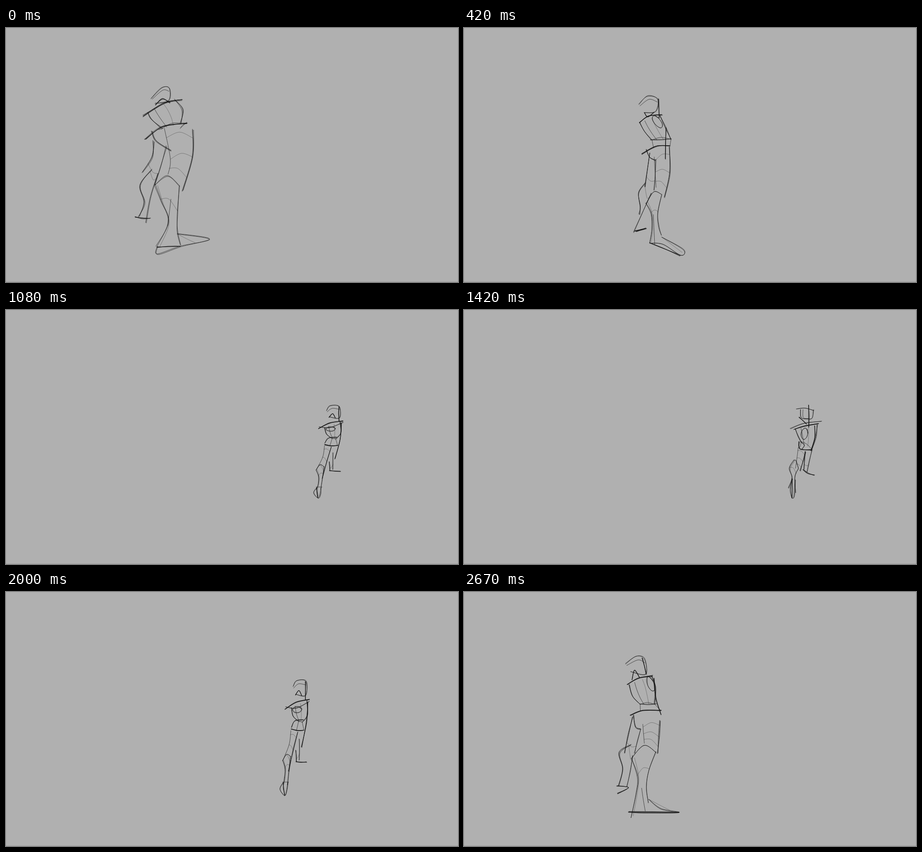
Write an HTML page that moves like this. It is 998x561 px and loops after 2830 ms.

```html
<!DOCTYPE html>
<html lang="en">
<head>
<meta charset="utf-8">
<title>Walking figure sketch</title>
<style>
html, body { margin: 0; width: 100%; height: 100%; overflow: hidden; background: #b0b0b0; }
svg { display: block; width: 998px; height: 561px; }
path { fill: none; stroke: #101010; stroke-linecap: round; stroke-linejoin: round; }
.n { stroke-width: .9; stroke-opacity: .74; }
.b { stroke-width: 1.2; stroke-opacity: .85; }
.f { stroke-width: .75; stroke-opacity: .45; }
</style>
</head>
<body>
<svg id="stage" viewBox="0 0 998 561"><rect y="560" width="998" height="1" fill="#a2a2a2"/></svg>
<script>
// Weight and number of passes for each part of the body
const style = {
  head: 'n2', strap: 'b2', neck: 'b2', shoulder: 'b3', chestL: 'n3', chestR: 'n3', hem: 'n2', side: 'b2',
  belt: 'b3', hip: 'n3', farL: 'n3', farR: 'n2', nearL: 'n1', nearR: 'n3', farA: 'n3', farB: 'n2',
  farFoot: 'b2', nearA: 'n2', nearB: 'n2', foot: 'n2', mid: 'n1'
};

// Each part is a line through a few points
const near = {
  head: '321 155 343 132 360 133 359 160 330 166', neck: '330 170 345 156 362 166',
  shoulder: '303 194 350 165 389 158', chestL: '313 186 322 203 345 222', chestR: '372 157 390 180 386 210',
  belt: '307 246 345 219 400 210', hem: '384 222 399 208', hip: '322 228 330 250 364 272',
  farL: '326 250 322 285 300 320', farR: '355 262 328 347', nearL: '350 222 363 290 358 323',
  nearR: '412 225 412 285 390 360', farA: '322 312 297 347 305 385 293 417', farB: '335 322 318 375 308 430',
  farFoot: '285 418 317 421', nearA: '328 348 342 382 358 428 333 484', nearB: '383 348 378 410 379 448 386 480',
  foot: '333 484 334 499 385 482 450 467 378 455', mid: '364 378 357 437'
};
const step = {
  head: '357 159 380 142 398 148 402 182 368 176', strap: '394 146 403 182', neck: '371 194 376 173 387 188',
  shoulder: '361 204 385 190 416 185', chestL: '364 204 372 230 389 248', chestR: '414 186 423 210 421 248',
  hem: '388 248 425 247', side: '420 190 424 235 435 270', belt: '367 272 395 261 435 262',
  hip: '375 272 378 298 391 303', farL: '372 276 354 356', farR: '390 304 376 356', nearL: '395 292 398 334',
  nearR: '433 284 428 356', farA: '368 338 343 355 350 390 341 428', farB: '373 362 360 430',
  farFoot: '338 428 363 432 339 446', nearA: '370 368 383 410 380 445 369 498',
  nearB: '424 354 408 395 403 430 407 466', foot: '363 486 400 488 475 487 435 478 408 458', mid: '392 433 400 484',
  arm: '412 203 7 17 -22'
};
const stand = {
  head: '386 168 405 151 428 157 424 184 398 187', strap: '430 157 431 198', neck: '398 187 406 196 420 186',
  shoulder: '388 209 408 194 437 192', chestL: '388 209 398 228 415 247', chestR: '432 193 446 222 457 246',
  hem: '412 247 458 245', side: '446 220 445 290', belt: '393 279 425 261 455 260', hip: '403 268 410 286 422 292',
  farL: '410 276 399 350', farR: '424 290 420 358', nearL: '420 285 424 352', nearR: '454 262 454 320 442 374',
  farA: '401 343 386 365 389 395 387 412', farB: '413 365 375 452', farFoot: '377 448 403 443 380 449',
  nearA: '402 387 414 410 415 445 410 475', nearB: '437 368 428 410 431 440 436 458',
  foot: '410 475 440 478 478 502 485 489 437 462', mid: '418 412 421 478', arm: '427 207 7 16 -38'
};
const lean = {
  head: '469 174 486 162 503 165 499 196 480 190', strap: '510 165 512 198', neck: '484 192 490 204 504 198',
  shoulder: '475 211 490 202 512 205', chestL: '476 210 482 238 498 257', chestR: '508 204 523 240 522 268',
  hem: '498 277 527 268', side: '526 262 520 309', belt: '480 294 495 288 512 284', hip: '482 292 492 276 510 270',
  farL: '483 298 481 354', farR: '491 294 494 357', nearL: '496 300 495 357', nearR: '518 306 511 379',
  farA: '483 346 466 372 472 402 473 428', farB: '489 359 479 385 484 410 478 444', farFoot: '471 428 482 426',
  nearA: '490 360 487 400 485 440 487 484', nearB: '508 362 497 405 497 440 498 465',
  foot: '487 485 505 487 522 488 505 455 485 440', mid: '475 446 492 472', arm: '500 220 8 17 -25'
};
const turn = {
  head: '545 203 544 184 562 184 576 213 556 206', strap: '576 181 576 213', neck: '551 207 542 235',
  shoulder: '537 220 556 216 576 227', chestL: '538 222 546 240 557 258', chestR: '574 228 581 248 577 270',
  belt: '556 260 567 265 576 273', hip: '536 283 546 270 556 258', hem: '541 291 570 293', side: '576 270 568 296',
  farL: '570 294 570 330 564 350', farR: '574 292 570 347', nearL: '546 292 557 345', nearR: '568 296 564 350',
  farA: '566 348 569 388', farB: '571 346 570 386', farFoot: '561 391 584 388',
  nearA: '535 365 548 390 546 408 540 416', nearB: '564 347 559 380 562 420',
  foot: '549 415 543 440 566 445 574 433 552 425', mid: '566 412 578 431'
};
const far = {
  head: '708 222 716 212 736 213 736 238 714 236', strap: '735 213 735 246', neck: '713 237 721 229 727 238',
  shoulder: '690 262 715 250 744 245', hem: '692 258 715 260 744 248', chestL: '704 260 708 274 720 284',
  chestR: '738 247 739 272 728 285', side: '740 250 738 285 726 329', belt: '704 297 718 300 732 299',
  hip: '704 294 712 283 730 281', farL: '714 335 715 355', farR: '722 315 722 352', nearL: '703 300 699 325 685 353',
  nearR: '718 303 708 335 698 372', farFoot: '714 355 738 356', nearA: '685 353 690 368 689 385 686 396',
  nearB: '702 346 695 396', foot: '686 392 679 404 689 415 694 406 696 392', mid: '685 391 698 391',
  arm: '717 263 10 5 0'
};
const back = {
  head: '727 217 728 235 742 238 753 236 755 218', strap: '745 207 745 257', hem: '718 216 737 214 756 219',
  neck: '724 234 740 250', shoulder: '713 262 735 254 767 249', collar: '704 260 735 248 773 244',
  chestL: '716 262 722 278 729 290', chestR: '764 251 761 278 752 307', side: '758 254 758 282 750 310',
  belt: '724 290 726 306 752 308', hip: '727 290 735 298 730 307', nearL: '722 303 716 350', nearR: '738 314 726 356',
  farL: '737 312 734 352', farR: '752 308 742 358', farFoot: '733 353 744 361 757 366',
  nearA: '713 332 703 350 708 372 700 394', nearB: '722 350 715 370 716 405',
  foot: '709 374 705 400 708 417 713 412 715 376', arm: '736 272 7 13 10'
};

// Drawing, looseness of repeated lines, optional boxes to fit from and to
const poses = [
  [near, 4.5],
  [step, 3.4, [337, 140, 479, 502], [331, 135, 483, 504]],
  [stand, 3],
  [lean, 2.6],
  [turn, 2.4],
  [far, 2.4, [678, 211, 745, 416], [604, 195, 671, 451]],
  [far, 2.2],
  [back, 2.4],
  [back, 2.4, [698, 207, 774, 419], [714, 210, 790, 417]],
  [step, 3.2]
];
const loop = 2830;
const times = [0, 250, 420, 580, 750, 920, 1080, 1250, 1420, 1670, 1830, 2000, 2170, 2330, 2500, 2670];
const order = [0, 1, 2, 3, 4, 5, 6, 7, 8, 7, 6, 5, 4, 3, 2, 9];

const stage = document.getElementById('stage');
const add = (parent, tag) => parent.appendChild(document.createElementNS('http://www.w3.org/2000/svg', tag));
const mix = (a, b, t) => a.map((v, k) => v + (b[k] - v) * t);

function random(seed) {
  return () => (seed = (seed * 16807) % 2147483647) / 2147483647;
}

function parse(text) {
  const n = text.split(' ').map(Number), p = [];
  for (let i = 0; i < n.length; i += 2) p.push([n[i], n[i + 1]]);
  return p;
}

// Place at share t along a line
function at(p, t) {
  const s = t * (p.length - 1), i = Math.min(Math.floor(s), p.length - 2);
  return mix(p[i], p[i + 1], s - i);
}

// Line lying between two others
const between = (a, b, t) => [0, .33, .67, 1].map(s => mix(at(a, s), at(b, s), t));

// Arch from a to b, raised by a share of its width
function arch(a, b, rise) {
  const m = mix(a, b, .5);
  return [a, [m[0], m[1] - Math.hypot(b[0] - a[0], b[1] - a[1]) * rise], b];
}

function ellipse(text) {
  const [x, y, rx, ry, deg] = text.split(' ').map(Number), r = deg * Math.PI / 180;
  return Array.from({ length: 10 }, (_, i) => {
    const a = i * Math.PI / 4 - 1, u = rx * Math.cos(a), v = ry * Math.sin(a);
    return [x + u * Math.cos(r) - v * Math.sin(r), y + u * Math.sin(r) + v * Math.cos(r)];
  });
}

// Smooth path through all points
function curve(p) {
  let d = `M${p[0]}`;
  for (let i = 0; i < p.length - 1; i++) {
    const a = p[i - 1] || p[i], b = p[i], c = p[i + 1], e = p[i + 2] || c;
    const h1 = b.map((v, k) => v + (c[k] - a[k]) / 6);
    const h2 = c.map((v, k) => v - (e[k] - b[k]) / 6);
    d += `C${h1} ${h2} ${c}`;
  }
  return d;
}

function drawPose(group, pose, loose, rnd, from, to) {
  const fit = p => from
    ? p.map((v, k) => to[k] + (v - from[k]) * (to[k + 2] - to[k]) / (from[k + 2] - from[k]))
    : p;

  function stroke(points, look = 'n1') {
    const p = points.length === 2 ? [points[0], mix(...points, .5), points[1]] : points;
    for (let n = 0; n < +look[1]; n++) {
      const wobble = n ? loose : loose * .15;
      const path = add(group, 'path');
      path.setAttribute('class', n > 1 ? 'n' : look[0]);
      path.setAttribute('d', curve(p.map(q => fit(q).map(v => +(v + (rnd() - .5) * wobble).toFixed(1)))));
    }
  }

  const part = {};
  for (const name in pose) {
    if (name === 'arm') continue;
    part[name] = parse(pose[name]);
    stroke(part[name], style[name] || 'n2');
  }
  const { head, chestL, chestR, belt, nearL, nearR, farL, farR, nearA, nearB, farA, farB, foot } = part;
  if (pose.arm) stroke(ellipse(pose.arm), 'n2');

  // brow, ribs, waist
  stroke([mix(head[0], head[4], .2), mix(head[1], head[3], .2), mix(head[2], head[3], .25)]);
  stroke(between(chestL, chestR, .25));
  stroke(between(chestL, chestR, .6), 'f1');
  stroke(arch(chestL[2], chestR[2], .12));
  stroke([chestL[2], at(belt, .4)]);
  stroke([chestR[2], belt[2]]);

  // rounding across the thighs, knee and calf
  for (const t of [.15, .5, .8]) stroke(arch(at(nearL, t), at(nearR, t), .22), 'f1');
  stroke(arch(at(farL, .7), at(farR, .7), -.25), 'f1');
  stroke(arch(nearA[0], nearB[0], .4), 'n2');
  stroke(arch(at(nearA, .3), at(nearB, .3), .3), 'f1');
  if (farA) stroke(arch(at(farA, .05), at(farB, .1), -.5), 'f1');
  stroke(between(nearA, nearB, .12), 'f1');

  // sole and ankle
  stroke([foot[0], foot[2]], 'b2');
  stroke([foot[4], mix(foot[2], foot[3], .5)], 'f1');
}

poses.forEach(([pose, loose, from, to], i) => {
  const group = add(stage, 'g');
  drawPose(group, pose, loose, random(71 + i * 977), from, to);
  const keys = times.map((t, k) => ({ offset: t / loop, opacity: order[k] === i ? 1 : 0, easing: 'steps(1, end)' }));
  keys.push({ offset: 1, opacity: order[order.length - 1] === i ? 1 : 0 });
  group.animate(keys, { duration: loop, iterations: Infinity });
});
</script>
</body>
</html>
```
